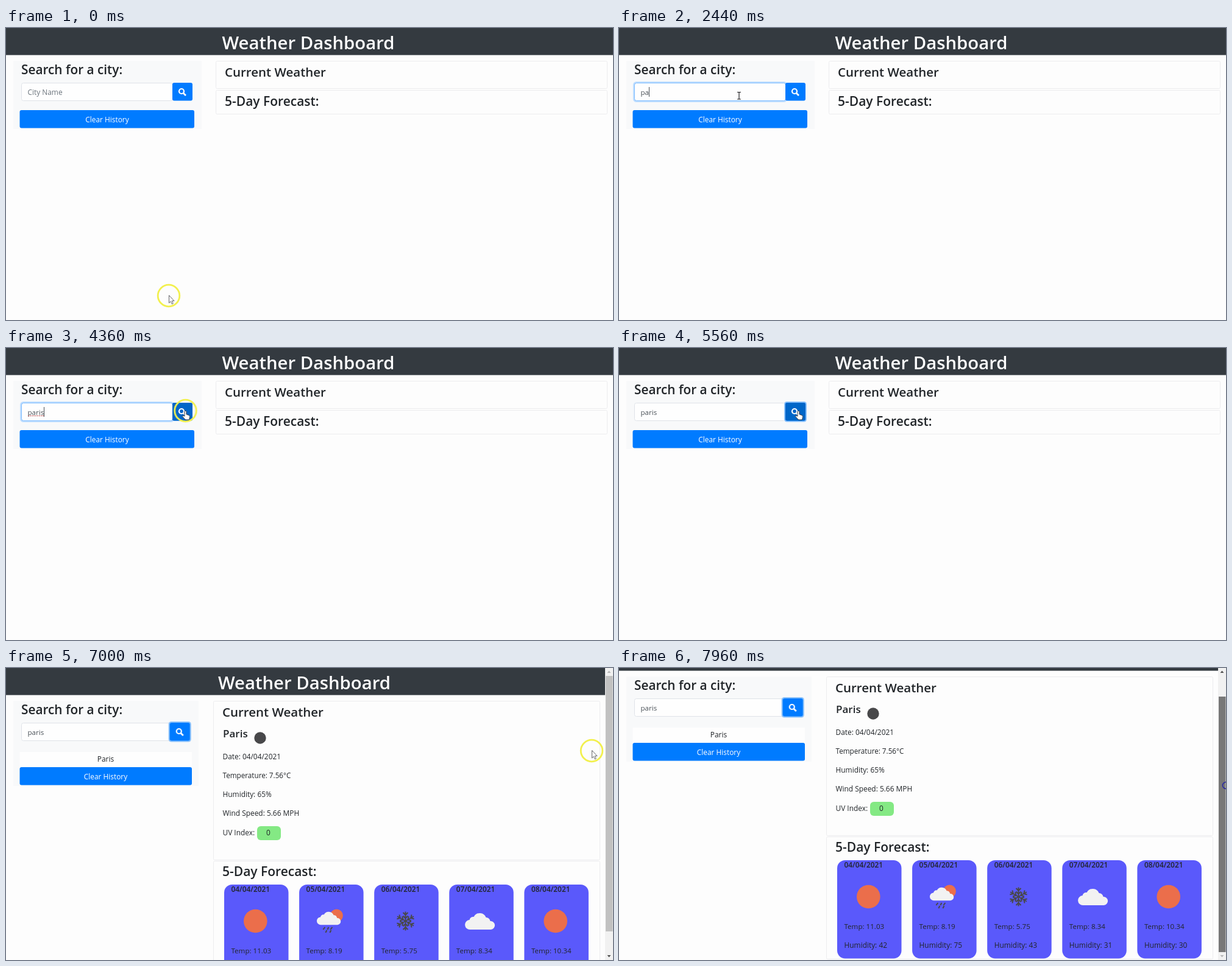
Recreate the animation shown at these times as an HTML page. Size 996 by 480 pixels, loop 8 s.

```html
<!DOCTYPE html>
<html lang="en">
<head>
<meta charset="utf-8">
<title>Weather Dashboard</title>
<style>
html, body { margin: 0; width: 100%; height: 100%; overflow: hidden; background: #fdfdfd; }
svg { display: block; width: 996px; height: 480px; }
text { font: 11.9px "Open Sans", "Noto Sans", sans-serif; fill: #212529; }
.h { font-weight: 600; }
.title { font-size: 29.3px; }
.current { font-size: 20.5px; }
.forecast { font-size: 21px; }
.mid { text-anchor: middle; }
.panel { fill: #f8f9fa; }
.box { fill: none; stroke: #ececee; }
.blue { fill: #007bff; }
.light { fill: #fff; }
.muted { fill: #6c757d; }
.typed { font-size: 11.6px; fill: #495057; }
.line { fill: none; stroke: #48484a; stroke-width: 2; }

.step { animation: 8s step-end infinite; }
.flow { animation: 8s linear infinite; }

/* 1% = 80ms */
#before { animation-name: before; }
.after { animation-name: after; }
#button { animation-name: nudge; }
#hover, #hand { animation-name: hover; }
#btnFocus { animation-name: btnFocus; }
#inFocus { animation-name: inFocus; }
#hint { animation-name: hint; }
#p { animation-name: p; }
#a { animation-name: a; }
#r { animation-name: r; }
#i { animation-name: i; }
#s { animation-name: s; }
#caret { animation-name: caret; }
#spell { animation-name: spell; }
#page { animation-name: scroll; }
#thumb { animation-name: thumb; }
#grip { animation-name: grip; }
#up { animation-name: up; }
#down { animation-name: down; }
#mouse { animation-name: move; }
#ring { animation-name: ring; }
#press { animation-name: press; }
#arrow { animation-name: arrow; }
#beam { animation-name: beam; }

@keyframes before { 0% { opacity: 1 } 72%, 100% { opacity: 0 } }
@keyframes after { 0% { opacity: 0 } 72%, 100% { opacity: 1 } }
@keyframes nudge { 0% { transform: none } 72%, 100% { transform: translateX(-4.3px) } }
@keyframes hover { 0%, 77.8%, 100% { opacity: 0 } 48.1% { opacity: 1 } }
@keyframes btnFocus { 0%, 57% { opacity: 0 } 59%, 100% { opacity: 1 } }
@keyframes inFocus { 0%, 14.5% { opacity: 0 } 16.5%, 57% { opacity: 1 } 59%, 100% { opacity: 0 } }
@keyframes hint { 0% { opacity: 1 } 27%, 100% { opacity: 0 } }
@keyframes p { 0% { opacity: 0 } 27%, 100% { opacity: 1 } }
@keyframes a { 0% { opacity: 0 } 29.5%, 100% { opacity: 1 } }
@keyframes r { 0% { opacity: 0 } 35%, 100% { opacity: 1 } }
@keyframes i { 0% { opacity: 0 } 38.5%, 100% { opacity: 1 } }
@keyframes s { 0% { opacity: 0 } 39.5%, 100% { opacity: 1 } }
@keyframes spell { 0%, 57%, 100% { opacity: 0 } 40.5% { opacity: 1 } }
@keyframes caret {
  0% { opacity: 0; transform: none }
  14.5% { opacity: 1; transform: none }
  21% { opacity: 0; transform: none }
  27% { opacity: 1; transform: translateX(7px) }
  29.5% { opacity: 1; transform: translateX(13px) }
  35% { opacity: 1; transform: translateX(18px) }
  38.5% { opacity: 1; transform: translateX(21px) }
  39.5% { opacity: 1; transform: translateX(26px) }
  46% { opacity: 0; transform: translateX(26px) }
  52.5% { opacity: 1; transform: translateX(26px) }
  57%, 100% { opacity: 0; transform: translateX(26px) }
}
@keyframes scroll { 0%, 93.5% { transform: none } 98%, 100% { transform: translateY(-40px) } }
@keyframes thumb { 0%, 93.5% { transform: none } 98%, 100% { transform: translateY(34px) } }
@keyframes grip { 0% { fill: #c1c1c1 } 92% { fill: #a8a8a8 } 93.5%, 100% { fill: #787878 } }
@keyframes up { 0% { fill: #b5b5b5 } 94%, 100% { fill: #505050 } }
@keyframes down { 0% { fill: #505050 } 98%, 100% { fill: #b5b5b5 } }
@keyframes move {
  0%, .5% { transform: translate(267px, 440px); animation-timing-function: ease-in-out }
  10.5%, 45% { transform: translate(197px, 111px); animation-timing-function: ease-in-out }
  50% { transform: translate(306px, 104px); animation-timing-function: ease-in-out }
  54%, 76.5% { transform: translate(294.5px, 103px); animation-timing-function: ease-in-out }
  86.5%, 87.5% { transform: translate(961px, 136px); animation-timing-function: ease-in-out }
  92%, 93.5% { transform: translate(990px, 158px) }
  98%, 100% { transform: translate(996px, 193px) }
}
@keyframes ring {
  0%, 14% { opacity: 1; transform: none }
  14.5%, 16% { opacity: 0; transform: scale(.4) }
  16.5%, 18% { opacity: 1; transform: none }
  21%, 45% { opacity: 0; transform: none }
  45.5%, 56.5% { opacity: 1; transform: none }
  57%, 58.5% { opacity: 0; transform: scale(.4) }
  59%, 63% { opacity: 1; transform: none }
  67.5%, 76.5% { opacity: 0; transform: none }
  77%, 93% { opacity: 1; transform: none }
  93.5%, 100% { opacity: 0; transform: scale(.4) }
}
@keyframes press {
  0%, 16%, 58.5% { opacity: 0 }
  14.5%, 57%, 93.5%, 100% { opacity: 1 }
}
@keyframes arrow { 0%, 77.8%, 100% { opacity: 1 } 9.5% { opacity: 0 } }
@keyframes beam { 0%, 48.1%, 100% { opacity: 0 } 9.5% { opacity: 1 } }
</style>
</head>
<body>
<svg viewBox="0 0 996 480">
  <defs>
    <path id="cloud" d="M-17 14a8 8 0 0 1-1-16a6 6 0 0 1 7-5a11 11 0 0 1 20 1a7 7 0 0 1 7 6a7 7 0 0 1 1 14z" fill="#f2f2f2"/>
    <circle id="sun" r="19.3" fill="#eb6e4b"/>
    <g id="shower">
      <circle cx="10" cy="-9" r="10.5" fill="#eb6e4b"/>
      <use href="#cloud" transform="translate(-2 -5) scale(.8)"/>
      <path class="line" d="M-9 10l-3 4M-3 10l-2 4M3 10l-3 4M-6 15l-2 4M1 15l-2 4"/>
    </g>
    <path id="arm" class="line" d="M0 0V-15.500M-4-14l4 4 4-4M-4-8.500l4 4 4-4"/>
    <g id="snow"></g>
  </defs>

  <g id="page" class="flow">
    <rect width="996" height="44.500" fill="#343a40"/>

    <g id="before" class="step">
      <text class="h mid light title" x="496" y="35">Weather Dashboard</text>
      <rect class="panel" x="12" y="54" width="309" height="112"/>
      <rect class="blue" x="22.500" y="135" width="286.500" height="29.500" rx="3"/>
      <text class="mid light" x="166" y="155">Clear History</text>
      <rect class="box" x="344.500" y="54.500" width="642" height="45" rx="2"/>
      <text class="h current" x="359" y="80">Current Weather</text>
      <rect class="box" x="344.500" y="102.500" width="642" height="39" rx="2"/>
      <text class="h forecast" x="359" y="128">5-Day Forecast:</text>
    </g>

    <g class="after step">
      <text class="h mid light title" x="489.500" y="35">Weather Dashboard</text>
      <rect class="panel" x="12" y="54" width="304" height="140"/>
      <rect x="22.500" y="138" width="282.500" height="26" fill="#fefefe"/>
      <text class="mid" x="163.500" y="154">Paris</text>
      <rect class="blue" x="22.500" y="163" width="282.500" height="29.500" rx="3"/>
      <text class="mid light" x="163.500" y="183">Clear History</text>
      <rect class="box" x="340.500" y="54.500" width="634" height="261" rx="2"/>
      <text class="h current" x="355" y="80">Current Weather</text>
      <text class="h" x="356" y="114" style="font-size:17px">Paris</text>
      <circle cx="417" cy="115" r="9.700" fill="#48484a"/>
      <text x="355.500" y="149.500">Date: 04/04/2021</text>
      <text x="355.500" y="180.800" style="font-size:11.7px">Temperature: 7.56°C</text>
      <text x="355.500" y="212">Humidity: 65%</text>
      <text x="355.500" y="243.200">Wind Speed: 5.66 MPH</text>
      <text x="355.500" y="274.500">UV Index:</text>
      <rect x="412" y="260" width="39" height="23" rx="6" fill="#84e984"/>
      <text class="mid" x="430.500" y="274.500">0</text>
      <rect class="box" x="340.500" y="317.500" width="634" height="201" rx="2"/>
      <text class="h forecast" x="355" y="342">5-Day Forecast:</text>
      <g id="cards"></g>
    </g>

    <text class="h" x="25" y="76" style="font-size:20.8px">Search for a city:</text>
    <rect x="25.500" y="90.500" width="248" height="29" rx="3" fill="#fefefe" stroke="#dfe3e8"/>
    <g id="inFocus" class="flow">
      <rect x="24.500" y="89.500" width="250" height="31" rx="4" fill="none" stroke="#bfdeff" stroke-width="3"/>
      <rect x="25.500" y="90.500" width="248" height="29" rx="3" fill="none" stroke="#80bdff"/>
    </g>
    <text id="hint" class="step muted" x="35.500" y="109.500">City Name</text>
    <g id="query"></g>
    <path id="spell" class="step" d="M36 111.500H62.500" stroke="#c04848" stroke-dasharray="2 1"/>
    <path id="caret" class="step" d="M36.500 97V113" stroke="#495057"/>

    <g id="button" class="step">
      <rect id="btnFocus" class="flow" x="271" y="88" width="37" height="33.500" rx="4.500" fill="#86bffb"/>
      <rect class="blue" x="273" y="90" width="33" height="29.500" rx="3"/>
      <rect id="hover" class="step" x="273" y="90" width="33" height="29.500" rx="3" fill="#0066c8"/>
      <g fill="none" stroke="#fff" stroke-width="2.200">
        <circle cx="288" cy="104" r="4"/>
        <path d="M291 107l4 4" stroke-width="2.600"/>
      </g>
    </g>
  </g>

  <g class="after step">
    <rect x="983" width="13" height="480" fill="#f1f1f1"/>
    <g id="thumb" class="flow"><rect id="grip" class="step" x="984" y="13" width="11.500" height="420"/></g>
    <path id="up" class="step" d="M986.500 8h6l-3-3.500z"/>
    <path id="down" class="step" d="M986.500 472h6l-3 3.500z"/>
  </g>

  <g id="mouse" class="flow">
    <circle id="ring" class="flow" r="17.800" fill="none" stroke="#f2f04e" stroke-width="2.800"/>
    <circle id="press" class="step" r="5.500" fill="none" stroke="#2a2aa0" stroke-width="1.600"/>
    <path id="arrow" class="step" d="M.5-.5V12l2.800-2.600 2 4.400 2-.9-2-4.300H9z" fill="#fff" stroke="#55555a" stroke-width=".9"/>
    <path id="beam" class="step" d="M-3-5.500h2.300l.7.700.7-.7H3M0-5V5.500M-3 6h2.300l.7-.7.7.7H3" fill="none" stroke="#202024" stroke-width="1.200"/>
    <path id="hand" class="step" d="M-1.500 1q1.500-2 3 0V6l4 1.500q2 .6 1.600 3L6 15H0L-5 9.500q0-2.200 2-1.300l1.500 1z" fill="#fff" stroke="#28282c" stroke-width=".9"/>
  </g>
</svg>
<script>
const fill = (id, items, draw) => {
  document.getElementById(id).innerHTML = items.map(draw).join("");
};

// One text per letter, so that each can appear by its own keyframes.
const letters = [["p", 35.5], ["a", 42.6], ["r", 49.1], ["i", 53.8], ["s", 56.7]];
fill("query", letters, ([c, x]) =>
  `<text id="${c}" class="typed step" x="${x}" y="109.5">${c}</text>`);

fill("snow", [0, 60, 120, 180, 240, 300], angle =>
  `<use href="#arm" transform="rotate(${angle})"/>`);

const days = [
  ["sun", "11.03", 42], ["shower", "8.19", 75], ["snow", "5.75", 43],
  ["cloud", "8.34", 31], ["sun", "10.34", 30]
];
fill("cards", days, ([icon, temp, humidity], n) => `
  <g transform="translate(${358 + n * 123.1} 356)">
    <rect width="105.5" height="161.5" rx="13" fill="#5a59fb"/>
    <text class="h" x="11.5" y="12">0${n + 4}/04/2021</text>
    <use href="#${icon}" x="51.3" y="60"/>
    <text x="11.5" y="113" style="font-size:11.6px">Temp: ${temp}</text>
    <text x="11.5" y="144">Humidity: ${humidity}</text>
  </g>`);
</script>
</body>
</html>
```
